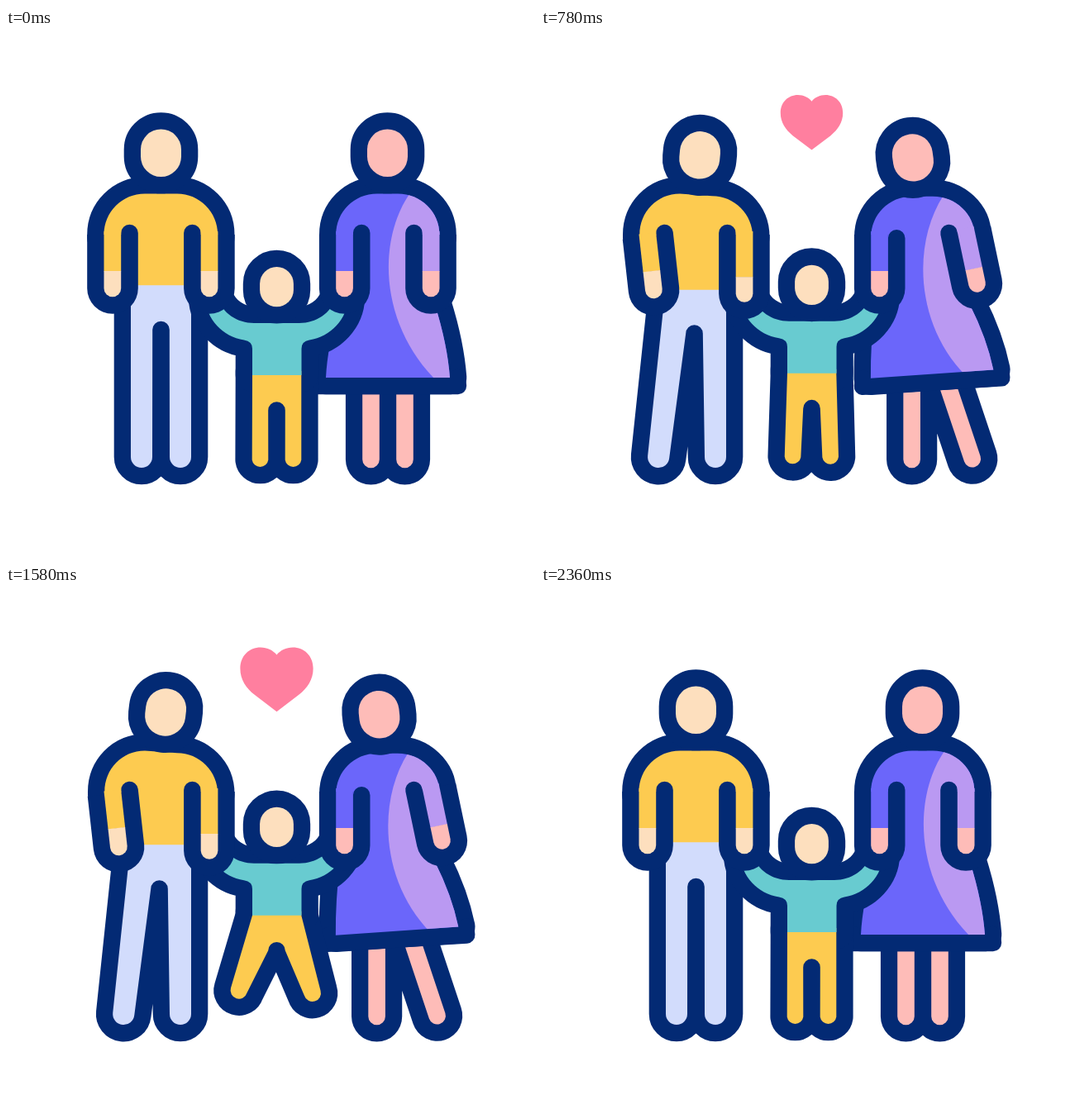
These frames come from a looping animation (640x640 px, 2400 ms). An HTML page with a canvas:

```html
<!DOCTYPE html>
<html lang="en">
<head>
<meta charset="utf-8">
<title>Family</title>
<style>
  html, body { margin: 0; width: 100%; height: 100%; overflow: hidden; background: #fff; }
  canvas { display: block; width: 100vw; height: 100vh; }
</style>
</head>
<body>
<canvas id="stage" width="640" height="640"></canvas>
<script>
const ctx = document.getElementById('stage').getContext('2d');
const LOOP = 2400, LINE = 40.6;
const NAVY = '#032a74', CREAM = '#fddfbe', ROSE = '#febcb8', YELLOW = '#fdcb50', PALE = '#d2dcfc',
  TEAL = '#68cbd0', PURPLE = '#6b66fa', LILAC = '#ba99f2', PINK = '#ff7f9f';

// Eased value at time t through [time, value] stops
function key(t, stops) {
  for (let i = 1; i < stops.length; i++) {
    const [t0, a] = stops[i - 1], [t1, b] = stops[i];
    if (t < t1) {
      const u = Math.max(0, (t - t0) / (t1 - t0));
      return a + (b - a) * u * u * (3 - 2 * u);
    }
  }
  return stops[stops.length - 1][1];
}

const LEAN = [[0, 0], [600, .76], [1360, 1], [2110, 0]];
const WAIST = [[0, 0], [540, 6], [1320, 4], [2170, 0]];
const DAD_NOD = [[0, 0], [1440, 1], [1880, -.32], [2380, 0]];
const MOM_NOD = [[0, 0], [1000, .8], [1400, 1], [1880, -.45], [2380, 0]];
const JUMP = [[120, 0], [420, 1], [720, 0], [1010, 1], [1300, 0], [1600, 1], [1890, 0]];
const BEAT = [[0, 0], [460, 1.07], [900, .84], [1500, 1.06], [2320, 0]];

function fill(d, color) {
  ctx.fillStyle = color;
  ctx.fill(new Path2D(d));
}

function stroke(d, width = LINE, color = NAVY) {
  ctx.strokeStyle = color;
  ctx.lineWidth = width;
  ctx.stroke(new Path2D(d));
}

function group(x, y, degrees, draw) {
  ctx.save();
  ctx.translate(x, y);
  ctx.rotate(degrees * Math.PI / 180);
  draw();
  ctx.restore();
}

// Capsule face whose chin sits at local y = chin
function head(r, height, chin, skin) {
  const face = new Path2D();
  face.roundRect(-r, chin - height, 2 * r, height, r);
  ctx.strokeStyle = NAVY;
  ctx.lineWidth = LINE;
  ctx.stroke(face);
  ctx.fillStyle = skin;
  ctx.fill(face);
}

// Arm hanging beside the gap at x; side is -1 (left) or 1 (right)
function arm(x, side, angle, sleeve, skin, cuff = 46, hand = 67, gap = 0) {
  group(x, 248, angle, () => {
    ctx.scale(side, 1);
    fill(`M-10.3 ${gap}A10.3 10.3 0 0 1 10.3 ${gap}V2H51.3V${hand}A30.8 30.8 0 0 1 -10.3 ${hand}z`, NAVY);
    fill(`M10.3 -2H31V${cuff + .5}H10.3z`, sleeve);
    fill(`M10.3 ${cuff}H31V${hand}A10.35 10.35 0 0 1 10.3 ${hand}z`, skin);
  });
}

function dad(g, w, nod) {
  const foot = 164 - 27.5 * g, gapX = 187.5 - 2.5 * g, gapY = 365 + .8 * w, tilt = 1.8 * g;
  const pants = `M151 311L${foot - 13} ${519 - tilt}A13 13 0 0 0 ${foot + 13} ${519 + tilt}
    L${gapX - 10.3} ${gapY}A10.3 10.3 0 0 1 ${gapX + 10.3} ${gapY}
    L198 519A13 13 0 0 0 224 519V311z`;
  const left = 118.5 + g, drop = 3.5 * g;
  const shirt = `M${left} 254V250C${left} 222.5 140.5 200.5 168 200.5L207 ${200.5 + drop}
    C234 ${200.5 + drop} 256.2 ${222.5 + drop} 256.2 ${250 + drop}V254H226V${311.2 + w}H149V254z`;
  stroke(pants);
  stroke(shirt);
  fill(pants, PALE);
  fill(shirt, YELLOW);
  arm(149.5, -1, -8 * g, YELLOW, CREAM, 46 - 2.5 * g);
  group(187.5, 200 + 3 * g, 9.7 * nod, () => head(24.5, 57.5, -20, CREAM));
}

function mom(g, nod) {
  const left = 441.5 + 9 * g;
  const legs = `M${left} 430V522M${482.5 + 11 * g} 430L${482.5 + 49.5 * g} ${522 - g}`;
  stroke(legs, 61.2);
  stroke(legs, 20.6, ROSE);

  const top = 200.5 + 4 * g;
  const lx = 387 + 15 * g, ly = 423 + g, rx = 537 + 13 * g, ry = 423 - 12 * g;
  const dress = `M399.3 254V${250 + 4 * g}C399.3 ${top + 22} 421 ${top} 449 ${top}H474
    C502 ${top} 524.5 ${top + 22} 524.5 ${250 + g}V254H494L506 300L519 335
    Q${534 + 7 * g} ${383 - 9 * g} ${rx} ${ry}L${lx} ${ly}
    Q${389 + 12 * g} 383 404 335L430 300V254z`;
  stroke(dress);
  // Squarer corners for the hem
  stroke(`M${lx - 9} ${ly}L${lx - 10} ${ly + 10}L${rx + 10} ${ry + 10}L${rx + 9} ${ry}`, 20.3);
  fill(dress, PURPLE);
  ctx.save();
  ctx.clip(new Path2D(dress));
  fill(`M490 198C448.5 256 451.5 358 ${521 - 9 * g} ${427 - 8 * g}L600 440V198z`, LILAC);
  ctx.restore();
  arm(493.5, 1, -15 * g, LILAC, ROSE, 46 + 3 * g);
  group(461.5 - 6 * g, 200 + 6.5 * g, -11.5 * nod, () => head(24.5, 57.5, -20, ROSE));
}

function kid(k) {
  const ax = 307.5 - 26 * k, ay = 522.5 - 12 * k, bx = 347.5 + 23.5 * k, by = 522.5 - 8.5 * k, tilt = 3 * k;
  const pants = `M298 415V420L${ax - 9.8} ${ay - tilt}A9.9 9.9 0 0 0 ${ax + 9.8} ${ay + tilt}
    L317.2 462.5A10.3 10.3 0 0 1 337.8 462.5
    L${bx - 9.8} ${by + tilt}A9.9 9.9 0 0 0 ${bx + 9.8} ${by - tilt}L357.3 420V415z`;
  const shirt = `M255 326C262 345 280 357 300 357H355C375 357 393 345 400 326H414
    C413 352 393 373.5 367 377.5Q357.5 379 357.5 388V420H298V388Q298 379 288 377.5
    C262 373.5 242 352 241 326z`;
  group(0, -20.5 * k, 0, () => {
    stroke(pants);
    stroke(shirt);
    fill(pants, YELLOW);
    fill(shirt, TEAL);
    group(327.5, 337.3, 0, () => head(20.4, 48.3, 0, CREAM));
  });
}

function heart(size) {
  group(327.5, 114.3, 0, () => {
    ctx.scale(size, size);
    fill(`M0 37.7L-26 18C-36 10 -42.8 0 -42.8 -13C-42.8 -28 -32 -37.7 -19 -37.7
      C-11 -37.7 -4 -34 0 -29C4 -34 11 -37.7 19 -37.7C32 -37.7 42.8 -28 42.8 -13
      C42.8 0 36 10 26 18z`, PINK);
  });
}

function frame(now) {
  const t = now % LOOP, g = key(t, LEAN);
  ctx.fillStyle = '#fff';
  ctx.fillRect(0, 0, 640, 640);
  ctx.lineJoin = ctx.lineCap = 'round';
  dad(g, key(t, WAIST), key(t, DAD_NOD));
  mom(g, key(t, MOM_NOD));
  kid(key(t, JUMP));
  // The hands holding the child lie on top
  arm(225.4, 1, 0, YELLOW, CREAM, 46 + 9 * g, 67 + 8 * g);
  arm(430.2, -1, 0, PURPLE, ROSE, 46, 67, 8 * g);
  heart(key(t, BEAT));
}

const start = performance.now();
function tick() {
  frame(performance.now() - start);
  requestAnimationFrame(tick);
}
tick();
</script>
</body>
</html>
```
